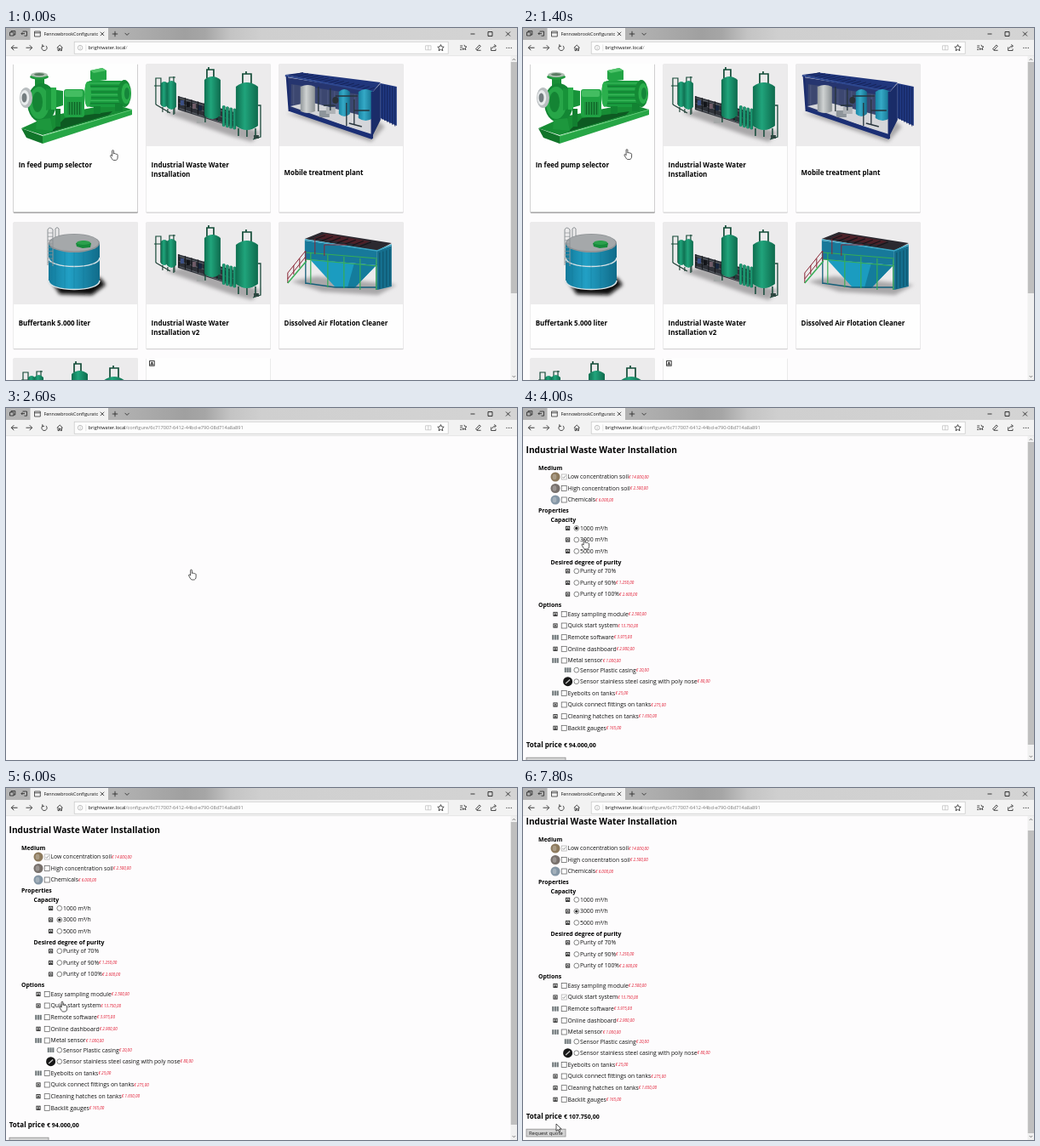
Write an HTML page that moves like this. It is 600 px wide and 414 px high and loops after 8 s.

```html
<!DOCTYPE html>
<html lang="en">
<head>
<meta charset="utf-8">
<title>Configurator</title>
<style>
html, body { margin: 0; width: 100%; height: 100%; overflow: hidden; background: #fdfcfd; }
svg { display: block; width: 100vw; height: 100vh; }
text { font-family: "Open Sans", "Noto Sans", sans-serif; fill: #111; white-space: pre; }
.b { font-weight: 700; fill: #000; }
.price { font-style: italic; font-size: 4.6px; fill: #e0142c; }
</style>
</head>
<body>
<svg id="stage" viewBox="0 0 600 414"></svg>
<script>
const LOOP = 8000, STEP = 200;

const rect = (x, y, w, h, fill, more = '') =>
  `<rect x="${x}" y="${y}" width="${w}" height="${h}" fill="${fill}" ${more}/>`;
const poly = (pts, fill, more = '') => `<polygon points="${pts}" fill="${fill}" ${more}/>`;
const oval = (cx, cy, rx, ry, fill, more = '') =>
  `<ellipse cx="${cx}" cy="${cy}" rx="${rx}" ry="${ry}" fill="${fill}" ${more}/>`;
const line = (d, stroke = '#222', w = .8, more = '') =>
  `<path d="${d}" fill="none" stroke="${stroke}" stroke-width="${w}" ${more}/>`;
const text = (x, y, size, s, cls = '') => `<text x="${x}" y="${y}" font-size="${size}" class="${cls}">${s}</text>`;
const repeat = (n, f) => Array.from({ length: n }, (_, i) => f(i)).join('');
const gradient = (id, ...stops) => `<linearGradient id="${id}">` +
  stops.map(([o, c]) => `<stop offset="${o}" stop-color="${c}"/>`).join('') + '</linearGradient>';
const shadow = (pts, fill = '#a9a7a9') => poly(pts, fill, 'filter="url(#soft)"');

// upright cylinder with domed ends
const tank = (x, y, w, h, fill, cap = 4) =>
  `<path d="M${x} ${y + cap}q${w / 2} ${-2 * cap} ${w} 0v${h - 2 * cap}q${-w / 2} ${2 * cap} ${-w} 0z" fill="${fill}"/>`;

// product pictures, each in a 145.5 x 97 box
const backdrop = () => rect(0, 0, 145.5, 97, '#ecebec');

const pump = () =>
  poly('9,76 34,84 139,54 116,47 40,62', '#178d35') +
  poly('9,76 34,85 34,94 15,87', '#11752a') +
  poly('34,85 139,54 139,60 34,94', '#27a646') +
  line('M34 85L139 54', '#58cb70', .8) +
  poly('44,80 112,60 116,56 60,64', '#0d5a22') +
  tank(25, 17, 11, 22, '#178f36', 1) +
  oval(30, 15.5, 11, 3.2, '#239a41') + oval(30, 13, 10, 3, '#aebdb1') + oval(30, 12.6, 6, 1.6, '#5c7a63') +
  oval(33, 46, 17, 23, '#138634') + oval(30, 46, 12, 19, '#27a648') + oval(28, 45, 6, 12, '#148434') +
  poly('38,29 58,32 58,49 38,55', '#179339') + rect(44, 28, 6, 26, '#2aae4b') +
  poly('27,66 43,64 46,79 26,77', '#1d973d') + rect(49, 53, 6, 21, '#128030') +
  oval(14.5, 40, 7.5, 12, '#b9bec0') + oval(13, 40, 5.2, 9, '#e9eced') + oval(12.5, 40, 3, 5.5, '#747d80') +
  rect(59, 30, 24, 33, '#1fa243', 'rx="3"') + rect(60, 31, 21, 8, '#43bd61', 'rx="2"') +
  rect(63, 45, 17, 15, '#0d6526') + repeat(6, i => line(`M${64 + i * 3} 45v15`, '#2fb453', 1.1)) +
  rect(84, 20, 48, 31, '#1a9c3f', 'rx="7"') +
  repeat(8, i => line(`M89 ${23 + i * 3.4}h38`, i % 2 ? '#0d742c' : '#3fbd5e', 1)) +
  oval(87, 36, 4, 15, '#2bb04d') +
  oval(130, 35, 8, 16, '#148a35') + oval(132, 35, 5.5, 12, '#2aae4b') + oval(133, 35, 3, 7, '#15863a') +
  poly('90,8 104,5 109,8 109,19 93,21 90,18', '#22a445') + poly('90,8 104,5 109,8 94,11', '#4fc46a') +
  rect(94, 50, 8, 9, '#128332') + rect(119, 47, 9, 9, '#128332');

const plant = () => backdrop() +
  shadow('22,58 44,54 134,80 124,92 96,84') +
  line('M11 48V17h6v31M9 26h9M32 60V15M34 16h-7v8', '#174a39', 1.2) +
  tank(17, 21, 8, 30, 'url(#teal)', 2) + tank(24, 20, 11, 34, 'url(#teal)', 3) +
  line('M19 51v6M25 53v5M33 52v7M11 48l17 10', '#1b3b31', 1.1) +
  poly('37,38 103,57 103,75 37,54', '#2e3138') +
  line('M37 40L103 60M37 46L103 67M37 52L103 74', '#747b82', .7) +
  repeat(8, i => rect(40 + i * 7, 43 + i * 2, 4, 6, ['#3b4f83', '#121419', '#6f5c68', '#17263d'][i % 4])) +
  repeat(9, i => line(`M${38 + i * 7.5} ${38 + i * 2.1}v16`, '#121417', .9)) +
  line('M71 17V7h8v9M73 7v-3M113 24V12h10v11M117 12V9', '#134c38', 1.7) +
  tank(68, 15, 19, 50, 'url(#teal)') +
  line('M69 62v7M85 62v6', '#144a3a', 1.4) +
  repeat(4, i => tank(89 + i * 4.2, 49 + i * 1.2, 3.6, 25, 'url(#teal)', 1)) +
  tank(105, 22, 26, 56, 'url(#teal)', 5) +
  line('M108 76v9M128 76v10M118 78v8', '#144a3a', 1.5) +
  line('M131 49h3v37l-9 3', '#1d4a3c', 1.3) +
  rect(59, 64, 9, 6, '#a4a7a7') + rect(126, 84, 6, 4, '#2d4640');

const container = () => backdrop() +
  shadow('8,58 108,92 124,74 110,62') +
  poly('9,16 110,32 108,87 12,54', '#26356f') +
  poly('14,24 106,38 106,66 14,48', '#3c4770') +
  repeat(12, i => line(`M${17 + i * 8} ${25 + i * 1.2}v24`, '#56618a', .7)) +
  poly('13,50 36,45 108,64 108,84', '#d5d6da') +
  poly('7,13 27,10.5 119,22 110,33', '#20367c') +
  repeat(15, i => line(`M${11 + i * 6.6} ${14.5 + i * 1.2}l${17 - i * .6} ${-4 + i * .05}`, '#152358', 1)) +
  line('M7 14L110 33', '#2d478f', 1.8) +
  poly('110,33 119,23 119,66 109,86', '#1a2c68') +
  tank(25, 25, 17, 33, 'url(#steel)', 2) +
  rect(47, 55, 12, 8, '#8d949a') + rect(55, 51, 11, 8, '#aeb2b6') +
  tank(70, 30, 13, 32, 'url(#aqua)', 3) + tank(93, 30, 17, 37, 'url(#aqua)', 3) +
  line('M46 27v29M60 29v26M66 38h26M79 46v27M88 42v29M88 55h18M82 70l15 4M52 49h14', '#27343d', 1.3) +
  oval(66, 43, 3.5, 4, '#2b3136') +
  poly('119,23 138,27 138,73 119,64', '#203982') +
  repeat(6, i => line(`M${121 + i * 3} ${24.5 + i * .6}v${41 + i}`, '#14235b', 1)) +
  poly('11,52 109,83 109,89 12,56', '#1b2f75') +
  line('M9 15L12 56M109 33v55', '#1a2c6d', 2.3);

const buffer = () => backdrop() +
  shadow('43,68 102,66 108,74 92,86 54,85', '#090909') +
  '<path d="M41 25v44c0 14 60 14 60 0V25z" fill="url(#blue)"/>' +
  line('M41 42c0 14 60 14 60 0M41 69c0 14 60 14 60 0', '#d7e2e6', 1.5) +
  repeat(5, i => line(`M${49 + i * 11} ${34 - (i % 4 ? 0 : 2)}v44`, '#137594', .4)) +
  oval(71, 25, 30, 11, '#8f9396') + oval(71, 24.5, 28.5, 9.8, '#a5a8aa') +
  poly('73,25 82,22 91,25 90,30 81,31 74,29', '#178a3b') + oval(82, 24.5, 8, 2.4, '#2ba04c') +
  line('M40 51V9q2-4 6 0v43M49 18V8q2-3 4 0v9', '#8d9295', 1) +
  repeat(9, i => line(`M40 ${13 + i * 4.3}h6`, '#8d9295', .7));

const flotation = () => backdrop() +
  shadow('14,70 44,64 138,74 116,86 50,82') +
  poly('30,22 115,34 115,51 30,44', '#17799a') +
  poly('36,44 114,51 88,78 66,77', '#1b9cc0') +
  poly('88,49 114,51 88,78 80,78', '#147c9c') +
  poly('115,34 132,28 132,76 115,80', '#156f8e') +
  repeat(4, i => line(`M${118 + i * 4} ${36 - i * 1.3}v43`, '#0e5069', 1)) +
  line('M31 44v29M114 50v30M31 72L66 77H114', '#155f79', 1.3) +
  poly('30,20 50,12 132,25 115,34', '#2b2930') +
  poly('41,19 54,14 107,23 95,27', '#4d2028') +
  repeat(7, i => line(`M${41 + i * 9} ${21 + i * 1.3}l13-5`, '#171419', 1.2)) +
  line('M30 21L115 34L132 27', '#3ba6c5', 1.5) +
  line('M31 44L115 52M31 36L115 43M37 37v36M57 39v38M76 41v37M95 43v37M114 44v36', '#36ad55', 1.2) +
  line('M10 60L31 34V46M10 67L31 41M10 60v12M17 51v11M24 43v11M42 38V20M53 40V27h26', '#8a2636', 1) +
  line('M10 72L32 46', '#36ad55', 1.5);

const pictures = { pump, plant, container, buffer, flotation };

const brokenIcon = (x, y, s = 5) =>
  rect(x, y, s, s, '#fff', 'stroke="#222" stroke-width=".9"') +
  oval(x + s / 2, y + s * .42, s * .2, s * .2, '#222') +
  rect(x + s * .15, y + s * .65, s * .7, s * .2, '#222');

const cards = [
  [0, 42, 175, 'pump', [164, 'In feed pump selector']],
  [1, 42, 175, 'plant', [164, 'Industrial Waste Water'], [175.3, 'Installation']],
  [2, 42, 175, 'container', [172.6, 'Mobile treatment plant']],
  [0, 228, 149.5, 'buffer', [350, 'Buffertank 5.000 liter']],
  [1, 228, 149.5, 'plant', [350, 'Industrial Waste Water'], [361.3, 'Installation v2']],
  [2, 228, 149.5, 'flotation', [350, 'Dissolved Air Flotation Cleaner']],
  [0, 388, 149.5, 'plant'],
  [1, 388, 149.5, '']
];

const drawCards = hover => cards.map(([col, y, h, pic, ...lines], i) => {
  const x = 9 + col * 155.9, on = i === hover;
  return rect(x - .4, y + .4, 146.3, h + .3, on ? '#989798' : '#d5d4d5', 'rx="1"') +
    rect(x, y, 145.5, h - .6, '#fefefe') +
    (pic ? `<use href="#${pic}" x="${x}" y="${y}"/>` : brokenIcon(168.6, 391.6, 5.6)) +
    lines.map(([ty, s]) => text(x + 5.7, ty, 7.95, s, 'b')).join('');
}).join('');

// y, kind (h heading, c checkbox, r radio), icon or indent, label, price
const rows = [
  [71, 'h', 18, 'Medium'],
  [81, 'c', '#8d7a5d', 'Low concentration soil', '14.000,00'],
  [94.5, 'c', '#77706c', 'High concentration soil', '2.500,00'],
  [108, 'c', '#8496a5', 'Chemicals', '6.000,00'],
  [121, 'h', 18, 'Properties'],
  [131.2, 'h', 32.5, 'Capacity'],
  [141.4, 'r', '', '1000 m³/h'],
  [155, 'r', '', '3000 m³/h'],
  [168.4, 'r', '', '5000 m³/h'],
  [181.8, 'h', 32.5, 'Desired degree of purity'],
  [191.8, 'r', '', 'Purity of 70%'],
  [205.5, 'r', '', 'Purity of 90%', '1.250,00'],
  [219, 'r', '', 'Purity of 100%', '2.600,00'],
  [232, 'h', 18, 'Options'],
  [242.4, 'c', '', 'Easy sampling module', '2.500,00'],
  [256, 'c', '', 'Quick start system', '13.750,00'],
  [269.7, 'c', 'bars', 'Remote software', '3.975,00'],
  [283.3, 'c', '', 'Online dashboard', '2.900,00'],
  [297, 'c', 'bars', 'Metal sensor', '1.000,00'],
  [308.2, 'r', 'bars', 'Sensor Plastic casing', '20,00'],
  [321.7, 'r', '#171717', 'Sensor stainless steel casing with poly nose', '80,00'],
  [335.4, 'c', 'bars', 'Eyebolts on tanks', '25,00'],
  [349, 'c', '', 'Quick connect fittings on tanks', '275,00'],
  [362.7, 'c', '', 'Cleaning hatches on tanks', '1.650,00'],
  [376.3, 'c', '', 'Backlit gauges', '165,00']
];

const rowIcon = (x, y, icon) => {
  if (!icon) return brokenIcon(x - 2.1, y - 2.1, 4.2);
  if (icon === 'bars') return rect(x - 4, y - 2.8, 8, 5.6, '#c9cccd') +
    repeat(3, i => rect(x - 3.7 + i * 2.8, y - 2.8, 1.7, 5.6, '#6f777a'));
  return oval(x, y, 5.5, 5.5, icon) + (icon === '#171717'
    ? line(`M${x - 2.5} ${y + 2.2}l5-4.4`, '#c4c4c4', 1.3)
    : oval(x - 1, y, 2.4, 3.2, '#fff', 'opacity=".25"'));
};

const drawRow = ([y, kind, icon, label, price], picked) => {
  if (kind === 'h') return text(icon, y + 2.4, 6.9, label, 'b');
  const box = kind === 'c', on = picked.includes(label);
  const mark = box
    ? rect(45.2, y - 3, 6, 6, '#fff', `stroke="${on ? '#aaa' : '#555'}" stroke-width=".7"`) +
      (on ? line(`M46.5 ${y}l1.3 1.4 2.4-3`, '#888', .8) : '')
    : oval(62.8, y, 2.9, 2.9, '#fff', 'stroke="#555" stroke-width=".7"') +
      (on ? oval(62.8, y, 1.6, 1.6, '#111') : '');
  const cost = price ? `<tspan class="price" dy="-.7">€ ${price}</tspan>` : '';
  return rowIcon(box ? 38 : 52.6, y, icon) + mark + text(box ? 52.5 : 67, y + 2.4, 6.83, label + cost);
};

const drawForm = (picked, total, scroll) => `<g transform="translate(0 ${-scroll})">` +
  text(3.6, 53.4, 10.15, 'Industrial Waste Water Installation', 'b') +
  rows.map(r => drawRow(r, picked)).join('') +
  text(3.8, 399.2, 8, 'Total price', 'b') + text(48, 399.2, 7, '€ ' + total, 'b') +
  rect(4, 411.2, 46, 8.8, '#d5d5d5', 'stroke="#8c8c8c" stroke-width=".8"') +
  text(7, 417.8, 5.85, 'Request quote') + '</g>';

const scrollbar = (y, h) => rect(592.5, 33, 7.5, 381, '#f0f0f0') + rect(592.8, y, 7.2, h, '#bfbfbf') +
  line('M594.7 38l1.7-1.8 1.7 1.8M594.7 409l1.7 1.8 1.7-1.8', '#666', .8);

const chrome = path =>
  rect(0, 0, 600, 14, 'url(#strip)') + rect(28.5, 0, 91.5, 14.5, '#f2f2f2') + rect(0, 14, 600, 18.6, '#f2f2f2') +
  line('M0 32.6h600', '#dcdcdc', .6) +
  line('M4.5 5h4.5v4h-4.5zM6 5V3.5h4.8V8H9M19.5 4h5v5.2h-3M22 6.6h-4m1.4-1.5L18 6.6l1.4 1.5', '#222', .8) +
  line('M33.5 4h6.8v6h-6.8zM33.5 5.8h6.8', '#333', .8) +
  '<svg x="44" y="0" width="64" height="14">' + text(.5, 9, 5.4, 'FennowbrookConfigurato') + '</svg>' +
  line('M110.8 4.7l4.4 4.4m0-4.4l-4.4 4.4M124.8 7h6.4M128 3.8v6.4M139.6 5.9l2.5 2.5 2.5-2.5', '#222', .8) +
  line('M545.5 7h5M566 4.5h5v5h-5zM587 4.5l5 5m0-5l-5 5', '#111', .8) +
  line('M6.5 23.2h7M9.3 20.2l-3 3 3 3', '#222', .9) +
  line('M23.5 23.2h7M27.7 20.2l3 3-3 3', '#333', .9) +
  line('M43.2 20.9a3.1 3.1 0 1 0 3.6 0M42.8 19.2v2.2h2.2', '#222', .8) +
  line('M59.8 23.3l3.4-3.2 3.4 3.2M61 22.6v4h1.5v-2.4h1.5v2.4h1.4v-4', '#222', .8) +
  rect(80.2, 16.2, 439, 14, '#fdfdfd', 'stroke="#c6c6c6" stroke-width=".7"') +
  line('M84.3 23.2a2.8 2.8 0 1 0 5.6 0a2.8 2.8 0 1 0-5.6 0M87.1 22.6v2.1M87.1 21.3v.6', '#999', .6) +
  line('M93.8 19.5v7.6', '#ccc', .5) +
  `<text x="96.6" y="25.2" font-size="5.6">brightwater.local<tspan fill="#777">/${path}</tspan></text>` +
  line('M492.6 20.8h6.4v5h-6.4zM495.8 20.8v5', '#bbb', .7) +
  line('M510.5 19.6l1.1 2.4 2.6.3-1.9 1.8.5 2.6-2.3-1.3-2.3 1.3.5-2.6-1.9-1.8 2.6-.3z', '#222', .8) +
  line('M533.2 21h3M533.2 23.2h2.6M533.2 25.5h2M538 19.8l.9 2 2 .2-1.5 1.4.4 2.2-1.8-1.1-1.6 1 .4-2.1', '#222', .8) +
  line('M551.5 24.8l4.3-4.8 1.5 1.3-4.3 4.8zM553 26.3h4.6', '#222', .8) +
  line('M569.6 22.5v4h5.4v-2M571 24.2c.4-2 1.7-3 3.6-3M573.3 19.4l2.2 1.8-2.2 1.8', '#222', .8) +
  repeat(3, i => oval(588 + i * 2.6, 23.3, .65, .65, '#222'));

const HAND = 'M-.9.6a.9.9 0 0 1 1.8 0v3.4l.3-.2c.5-.5 1.3-.3 1.5.3.5-.4 1.3-.2 1.5.4.6-.3 1.4.1 1.4.9v2.6' +
  'c0 2-1 3.5-2.4 3.5h-2c-1.2 0-1.8-.7-2.5-2l-1.6-2.8c-.4-.9.6-1.6 1.3-.9l.7.8z';
const ARROW = 'M0 0v8.5l2-1.9 1.4 3 1.3-.6-1.3-2.9h2.7z';

// pointer tip: time, x, y
const moves = [
  [0, 125.5, 144], [200, 125.5, 144], [1200, 122, 143], [1400, 122, 143], [2200, 217.5, 190.5],
  [3000, 217.5, 190.5], [3800, 72, 154.5], [4600, 72, 154.5], [5800, 66, 251.5],
  [6600, 66, 251.5], [7800, 39, 395]
];
const ease = u => u * u * (3 - 2 * u);

function pointer(t) {
  const n = moves.findIndex(m => m[0] > t);
  if (n < 0) return moves[moves.length - 1].slice(1);
  const [t0, x0, y0] = moves[n - 1], [t1, x1, y1] = moves[n];
  const u = ease((t - t0) / (t1 - t0));
  return [x0 + (x1 - x0) * u, y0 + (y1 - y0) * u];
}

const stage = document.getElementById('stage');
stage.innerHTML = '<defs>' +
  '<filter id="soft" x="-20%" y="-40%" width="140%" height="180%"><feGaussianBlur stdDeviation="2.2"/></filter>' +
  gradient('strip', [0, '#b4b4b4'], [.22, '#b2b2b2'], [.35, '#a0a0a0'], [.39, '#a6a6a6'], [.44, '#c4c4c4'], [.5, '#cfcfcf'], [1, '#d4d4d4']) +
  gradient('teal', [0, '#0e6f50'], [.4, '#20a47b'], [1, '#0e6a4d']) +
  gradient('blue', [0, '#127a9b'], [.4, '#22a0c5'], [1, '#116b89']) +
  gradient('aqua', [0, '#1784a4'], [.4, '#35a9c6'], [1, '#146f8e']) +
  gradient('steel', [0, '#92989b'], [.4, '#cfd2d2'], [1, '#8b9194']) +
  Object.entries(pictures).map(([id, draw]) => `<g id="${id}">${draw()}</g>`).join('') +
  '</defs><g id="page"></g><g id="bar"></g><path id="cursor" stroke="#111" stroke-width=".7" fill="#fff" stroke-linejoin="round"/>';
const [page, bar, cursor] = ['page', 'bar', 'cursor'].map(id => document.getElementById(id));

function put(node, html) {
  if (node.last !== html) node.innerHTML = node.last = html;
}

function render(time) {
  const t = Math.floor(time % LOOP / STEP) * STEP;
  const [x, y] = pointer(t);
  const home = t < 2600, form = t >= 3000;
  const onGap = home && x > 154.5 && x < 165;
  const scroll = 10 * ease(Math.min(1, Math.max(0, (t - 6800) / 400)));
  let html = rect(0, 32, 600, 382, '#fdfcfd');
  if (home) {
    html += drawCards(x <= 154.5 ? 0 : x >= 165 ? 1 : -1) + scrollbar(40, 272);
  } else if (form) {
    const picked = ['Low concentration soil', t < 4400 ? '1000 m³/h' : '3000 m³/h'];
    if (t >= 6200) picked.push('Quick start system');
    html += drawForm(picked, t < 6400 ? '94.000,00' : '107.750,00', scroll) + scrollbar(40 + scroll, 356);
  }
  put(page, html);
  put(bar, chrome(home ? '' : 'configure/6c717007-6412-44bd-e790-08d714a8a891'));
  const hand = home ? !onGap : !form || (t >= 3600 && t <= 6600);
  cursor.setAttribute('d', hand ? HAND : ARROW);
  cursor.setAttribute('transform', `translate(${x} ${y})`);
}

const start = performance.now();
function tick() {
  render(performance.now() - start);
  requestAnimationFrame(tick);
}
tick();
</script>
</body>
</html>
```
